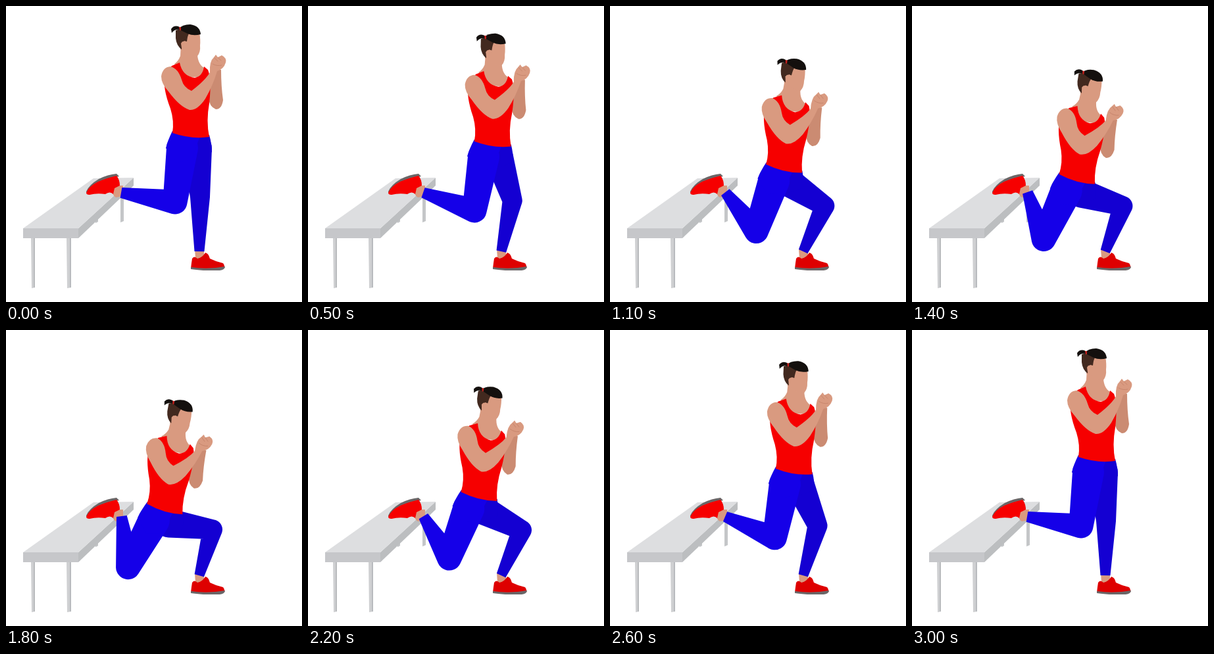
An HTML page for the animation above (3100 ms loop, 450 px wide and 450 px high).

```html
<!DOCTYPE html>
<html>
<head>
<meta charset="utf-8">
<title>Split squat</title>
<style>
html, body { margin: 0; width: 100%; height: 100%; overflow: hidden; background: #fff; }
svg { display: block; width: 100vw; height: 100vh; }
.red { fill: #f60000; }
.skin { fill: #d99a80; }
.shade { fill: #cb8b72; }
.hair { fill: #14100e; }
.sole { fill: #6a6667; }
.near { fill: #1500e8; }
.far { fill: #1400d2; }
.line { fill: none; stroke: #c48269; stroke-width: .8; stroke-linecap: round; }
</style>
</head>
<body>
<svg viewBox="0 0 450 450">
  <g id="bench">
    <path fill="#c4c6c8" d="M135 318h5v10l-4 2zM174 285h5v42l-5 2z"/>
    <path fill="#cfd0d2" d="M38 352h6v76l-5 1zM92 352h7v76l-6 1z"/>
    <path fill="#b9bbbe" d="M42 352h2v76h-2zM97 352h2v76h-2z"/>
    <path fill="#bcbec0" d="M110 338L194 261V273L110 353z"/>
    <path fill="#c6c7ca" d="M26 338H110V353H26z"/>
    <path fill="#dddee0" d="M26 338L133 262L194 261L110 338z"/>
  </g>
  <g id="feet">
    <path class="skin" d="M161 278L170 273H178V289L167 291Q162 289 161 278z"/>
    <path class="sole" d="M122 282Q126 272 141 263Q155 256 168 255L172 259Q140 266 122 284z"/>
    <path class="red" d="M122 284Q126 274 140 267Q155 261 168 258Q173 264 173 273L165 277L163 286Q158 281 151 286Q138 284 127 287Q122 287 122 284z"/>
    <path class="skin" d="M287 369H301V379Q296 386 288 384z"/>
    <path fill="#de0000" d="M283 384Q286 379 291 384Q298 383 303 375Q308 376 310 384Q320 389 330 391Q333 395 332 399H281Q282 390 283 384z"/>
    <path class="sole" d="M281 397Q306 401 333 396Q333 401 325 402H300Q288 401 281 400z"/>
  </g>
  <path id="farLeg" class="far"/>
  <path class="far lean" d="M270 190L309 196Q313 210 313 222L285 236z"/>
  <path id="nearLeg" class="near"/>
  <path class="near lean" d="M253 190L296 195L282 234L260 238L243 216Q246 204 253 190z"/>
  <g class="lean">
    <path class="shade" d="M305 104Q316 108 317 97H327Q327 122 330 143Q328 157 319 157Q309 153 308 140z"/>
    <path class="skin" d="M266 58L265 76Q262 84 256 88L270 108H298L303 95Q292 90 291 74z"/>
    <path class="red" d="M252 91L264 86Q268 107 287 109Q299 107 301 92L307 97Q313 112 309 148Q304 175 309 199Q282 203 253 193Q256 175 250 156Q238 125 241 104z"/>
    <path class="skin" d="M264 40H294Q296 52 295 60Q296 70 291 76Q286 78 276 72L265 66z"/>
    <path fill="#42291f" d="M258 37Q270 32 278 42Q276 45 275 54L271 53Q267 55 267 66Q259 60 258 49z"/>
    <path class="skin" d="M266 57Q269 51 272 56Q271 62 267 64z"/>
    <path class="hair" d="M262 35Q268 28 280 28Q295 30 296 43Q285 46 276 42Q268 38 262 35z"/>
    <path class="hair" d="M251 35Q256 28 264 32V36Q256 35 252 41z"/>
    <path fill="#c3201c" d="M263 32H266V37H264z"/>
    <path class="skin" d="M236 107Q238 93 250 92Q262 95 267 112Q270 124 282 129Q303 113 310 101Q309 84 316 78L319 74L322 78L328 75Q336 79 334 86Q331 96 321 99Q315 120 303 141Q291 159 279 158Q264 153 247 130Q236 118 236 107z"/>
    <path class="line" d="M317 79L322 84M322 78L327 83M314 88Q321 92 328 90"/>
  </g>
</svg>
<script>
const LOOP = 3100, STEP = 100;
const LOW = 1800, UP = 3000, MAX = 1.12;
const $ = id => document.getElementById(id);

// Quadratic path of a joint: 0 is standing, 1 is a deep squat.
const arc = (a, c, b) => s =>
  a.map((v, i) => v * (1 - s) ** 2 + 2 * c[i] * s * (1 - s) + b[i] * s * s);

const hipAt = arc([281, 196], [284, 230], [250, 264]);
const legs = [
  { id: 'nearLeg', hip: [-13, 20], knee: arc([257, 298], [252, 331], [199, 355]), cuff: [176, 284], r: [24, 18.5, 8] },
  { id: 'farLeg', hip: [10, 20], knee: arc([295, 290], [341, 306], [320, 304]), cuff: [294, 372.5], r: [22, 15, 7.5] }
];

// Tapered bone between two circles; the thin end may be cut flat.
function bone(p, r, q, s, flat) {
  const dx = q[0] - p[0], dy = q[1] - p[1];
  const dir = Math.atan2(dy, dx), open = Math.acos((r - s) / Math.hypot(dx, dy));
  const on = (c, rad, a) =>
    `${(c[0] + rad * Math.cos(a)).toFixed(2)} ${(c[1] + rad * Math.sin(a)).toFixed(2)}`;
  const end = flat ? 'L' : `A${s} ${s} 0 0 1 `;
  return `M${on(p, r, dir + open)}A${r} ${r} 0 1 1 ${on(p, r, dir - open)}` +
    `L${on(q, s, dir - open)}${end}${on(q, s, dir + open)}Z`;
}

function turn([x, y], deg) {
  const a = deg * Math.PI / 180, c = Math.cos(a), s = Math.sin(a);
  return [x * c - y * s, x * s + y * c];
}

// Sine easing down, then a quicker one up, then a short rest.
function squat(t) {
  const u = t < LOW ? t / LOW : Math.max(0, (UP - t) / (UP - LOW));
  return MAX * Math.sin(u * Math.PI / 2) ** 2;
}

function draw(ms) {
  const s = squat(Math.floor((ms % LOOP) / STEP) * STEP);
  const [x, y] = hipAt(s), lean = 9.3 * s;
  for (const { id, hip, knee, cuff, r } of legs) {
    const [hx, hy] = turn(hip, lean), k = knee(s);
    $(id).setAttribute('d', bone([x + hx, y + hy], r[0], k, r[1]) + bone(k, r[1], cuff, r[2], true));
  }
  for (const el of document.querySelectorAll('.lean'))
    el.setAttribute('transform', `translate(${x} ${y}) rotate(${lean}) translate(-281 -196)`);
}

const start = performance.now();
function tick() {
  draw(performance.now() - start);
  requestAnimationFrame(tick);
}
tick();
</script>
</body>
</html>
```
